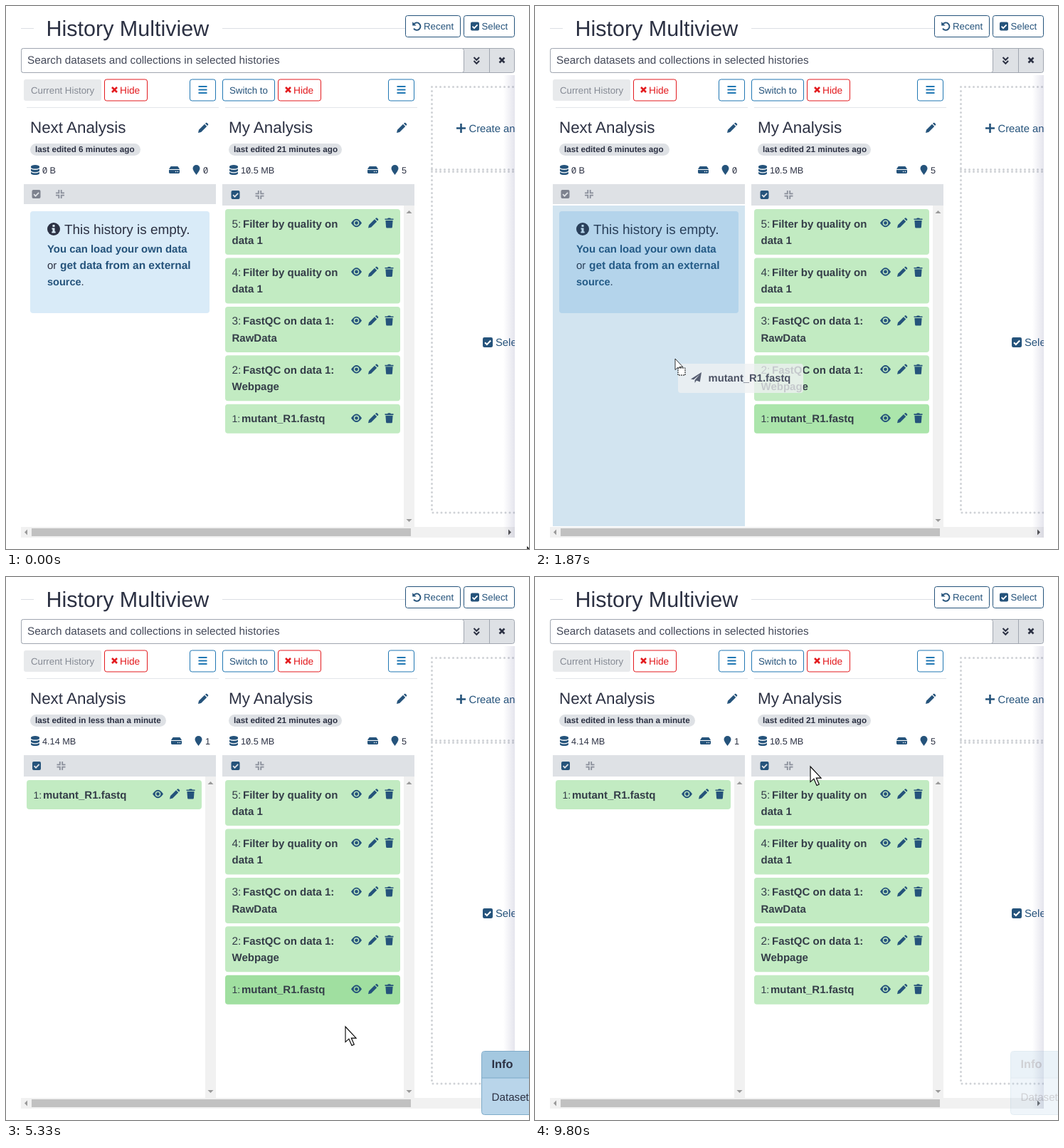
Write an HTML page that moves like this. It is 735x762 px and loops after 9870 ms.

```html
<!DOCTYPE html>
<html lang="en">
<head>
<meta charset="utf-8">
<title>History Multiview</title>
<style>
  html, body { margin: 0; width: 100%; height: 100%; overflow: hidden; background: #fff; }
  svg { display: block; width: 735px; height: 762px; }
  text { font-family: "Liberation Sans", Arial, sans-serif; text-rendering: geometricPrecision; white-space: pre; }
</style>
</head>
<body>
<svg id="stage" viewBox="0 0 735 762"></svg>
<script>
const LOOP = 9870, STEP = 1000 / 15;
const INK = '#2c3143', NAVY = '#25537b', BLUE = '#2077b3', RED = '#e31a1e';
const GREY = '#8a8f9b', BAR = '#dee1e5', TRACK = '#f1f1f1', GREEN = '#c2ebc2', LABEL = '#343d48';

// Drawing helpers
const rect = (x, y, w, h, fill, r = 0, stroke = 'none') =>
  `<rect x="${x}" y="${y}" width="${w}" height="${h}" rx="${r}" fill="${fill}" stroke="${stroke}"/>`;
const text = (x, y, size, s, fill = INK, bold = false) =>
  `<text x="${x}" y="${y}" font-size="${size}" fill="${fill}" font-weight="${bold ? 700 : 400}">${s}</text>`;
const bold = (x, y, size, s, fill = INK) => text(x, y, size, s, fill, true);
const solid = (x, y, d, fill = NAVY) =>
  `<path transform="translate(${x} ${y})" d="${d}" fill="${fill}" fill-rule="evenodd"/>`;
const line = (x, y, d, color, width = 1, extra = '') =>
  `<path transform="translate(${x} ${y})" d="${d}" fill="none" stroke="${color}" stroke-width="${width}" ${extra}/>`;
const group = (id, body) => `<g id="${id}">${body}</g>`;
const ring = (x, y, r) => `M${x - r} ${y}a${r} ${r} 0 1 0 ${2 * r} 0a${r} ${r} 0 1 0 ${-2 * r} 0z`;

const SHAPE = {
  pencil: 'M0 14l1-4.2 8-8 3.2 3.2-8 8zM10 .9l.9-.9q.8-.6 1.6 0l1.5 1.5q.6.8 0 1.6l-.9.9z',
  eye: 'M0 5.5Q7.5-6 15 5.5Q7.5 17 0 5.5z' + ring(7.5, 5.5, 3.8) + ring(7.5, 5.5, 2.4),
  trash: 'M0 1h3.6l.8-1h3.2l.8 1H12v1.6H0zM.9 3.5h10.2l-.7 9.3q-.1 1.2-1.2 1.2H2.8q-1.1 0-1.2-1.2z',
  disks: 'M0 2.2a6 2.2 0 0 1 12 0v1.2a6 2.2 0 0 1-12 0zM0 5.4q6 3.4 12 0v2.6a6 2.2 0 0 1-12 0z' +
    'M0 9.9q6 3.4 12 0v2a6 2.2 0 0 1-12 0z',
  drive: 'M3.2 0h8.6q.8 0 1.2.7L15 4H0L2 .7Q2.4 0 3.2 0zM0 5h15v3.6q0 1.4-1.4 1.4H1.4Q0 10 0 8.6z' +
    ring(9.6, 7.5, .8) + ring(12.4, 7.5, .8),
  marker: 'M5 14Q0 7.5 0 5a5 5 0 0 1 10 0Q10 7.5 5 14z',
  plane: 'M0 9.5L15 0 12.8 13.5 8 11.6 5.6 15V11l7-8-8.6 7.3z',
  arrow: 'M0 0V21.6l4.9-4.4 4.1 9.2 3.3-1.5-4-8.8h6.8z'
};
const cross = (x, y, color) => line(x, y, 'M1 1l7 7M8 1l-7 7', color, 2.6);
const menu = (x, y, color) => line(x, y, 'M0 1h12M0 5.5h12M0 10h12', color, 1.8);
const check = (x, y, color = NAVY, bg = BAR, size = 12) =>
  `<g transform="translate(${x} ${y}) scale(${size / 12})">` +
  rect(0, 0, 12, 12, color, 2) + line(2.6, 6.2, 'M0 0l2.4 2.4 4.6-4.8', bg, 1.8) + '</g>';
const compress = (x, y) =>
  line(x, y, 'M4.3 0v4.3H0M7.7 0v4.3H12M4.3 12V7.7H0M7.7 12V7.7H12', GREY, 1.8);
const slash = (x, y) => line(x, y, 'M1.8-1.2L5.3-8', INK, .9);

function item(x, y, num, lines, id = '') {
  const [gap, size] = num === 1 ? [13, 14] : [15, 15.4];
  return `<rect ${id && `id="${id}"`} x="${x}" y="${y}" width="246" height="${lines.length > 1 ? 64 : 41}" rx="4" fill="${GREEN}"/>` +
    text(x + 9.5, y + 25.5, size, num + ':', LABEL) + bold(x + 10 + gap, y + 25.5, 15, lines[0], LABEL) +
    (lines[1] ? bold(x + 9.5, y + 49, 15, lines[1], LABEL) : '') +
    solid(x + 177, y + 14, SHAPE.eye) + solid(x + 201, y + 12.5, SHAPE.pencil) +
    solid(x + 224.5, y + 12.5, SHAPE.trash);
}

function scroller(x) {
  return rect(x, 280, 15, 451, TRACK) + solid(x + 7.5, 287, 'M-4 4L0 0l4 4z', '#9a9a9a') +
    solid(x + 7.5, 720, 'M-4 0L0 4l4-4z', '#9a9a9a');
}

function columnTop(x, title, hideX) {
  return rect(hideX, 103, 60, 30, '#fff', 3, RED) + cross(hideX + 9.5, 113, RED) +
    text(hideX + 21.5, 122.5, 13.7, 'Hide', RED) +
    rect(x + 233.5, 103, 36, 30, '#fff', 3, BLUE) + menu(x + 245.5, 112, BLUE) +
    rect(x + 4, 142, 270, 1, '#e3e6ea') + text(x + 9, 178, 22.4, title) + solid(x + 245, 164, SHAPE.pencil);
}

function stats(x, edited, pill, size, count, shift) {
  return rect(x + 9, 193, pill, 17, BAR, 8.5) + bold(x + 16, 205.3, 11.7, edited) +
    solid(x + 10, 223, SHAPE.disks) + text(x + 26, 234.7, 12.7, size) +
    solid(x + 204 + shift, 225, SHAPE.drive) + solid(x + 237.5 + shift, 223, SHAPE.marker) +
    text(x + 252 + shift, 234.7, 12.7, count);
}

const header =
  rect(21, 31, 18, 1, '#dcdfe4') + rect(304, 31, 258, 1, '#dcdfe4') + text(56.5, 41.5, 30.5, 'History Multiview') +
  rect(561.5, 13.5, 77, 30, '#fff', 3, NAVY) +
  line(571, 22, 'M1.9 3.8A5.2 5.2 0 1 1 2 9.6', NAVY, 1.9) + solid(571, 22, 'M.2.2v5.4h5.4z') +
  text(587, 33, 13.3, 'Recent', NAVY) +
  rect(643.5, 13.5, 71, 30, '#fff', 3, NAVY) + check(653, 22.5, NAVY, '#fff') + text(668.5, 33, 13.2, 'Select', NAVY) +
  rect(21.5, 59.5, 693, 34, BAR, 3, '#a0a6b0') + rect(21.5, 59.5, 622, 34, '#fff', 3, '#a0a6b0') +
  rect(679, 60, 1, 33, '#a0a6b0') + text(30, 81, 15.3, 'Search datasets and collections in selected histories', '#454a5a') +
  line(656.5, 71, 'M1 1l3.8 3.8L8.6 1M1 6l3.8 3.8L8.6 6', INK, 2) + cross(692.5, 71.5, INK);

const emptyHistory =
  stats(25, 'last edited 6 minutes ago', 155, '0 B', '0', 0) + slash(51, 234.7) + slash(277, 234.7) +
  rect(25, 250, 270, 28, BAR) + check(36.5, 258, '#7d828e') + compress(70, 258) +
  rect(34, 288, 252, 143, '#d9ebf8', 4) + `<circle cx="67" cy="313" r="9" fill="${INK}"/>` +
  solid(67, 313, 'M-1.5-6h3v3h-3zM-2.5-1.5h4v5h1.2v2h-5.4v-2h1.2v-3h-1z', '#d9ebf8') +
  text(82, 320, 18.95, 'This history is empty.') + bold(58, 346, 14.9, 'You can load your own data', NAVY) +
  text(58, 369, 15, 'or') + bold(76, 369, 15.45, 'get data from an external', NAVY) +
  bold(58, 392, 14.5, 'source', NAVY) + text(105.5, 392, 15, '.');

const filledHistory =
  stats(25, 'last edited in less than a minute', 191, '4.14 MB', '1', 3) +
  rect(25, 250, 270, 30, BAR) + check(37, 259) + compress(71.5, 259) +
  scroller(280) + item(29, 285, 1, ['mutant_R1.fastq']);

const names = [['Filter by quality on', 'data 1'], ['Filter by quality on', 'data 1'],
  ['FastQC on data 1:', 'RawData'], ['FastQC on data 1:', 'Webpage'], ['mutant_R1.fastq']];

const columns =
  rect(25, 103, 109, 30, '#e8eaec', 3) + text(35, 122.5, 13.25, 'Current History', '#858a94') +
  columnTop(25, 'Next Analysis', 138.5) + group('empty', emptyHistory) + group('filled', filledHistory) +
  `<rect id="dropzone" x="25" y="280" width="270" height="450" fill="#1e78b4" fill-opacity=".2"/>` +
  rect(304.5, 103, 73, 30, '#fff', 3, BLUE) + text(314, 122.5, 13.3, 'Switch to', NAVY) +
  columnTop(304, 'My Analysis', 382.5) + stats(304, 'last edited 21 minutes ago', 159, '10.5 MB', '5', 0) + slash(337.1, 234.7) +
  rect(304, 250, 270, 30, BAR) + check(316.5, 259) + compress(350.5, 259) + scroller(559) +
  names.map((n, i) => item(308, 285 + i * 68.45, 5 - i, n, i === 4 ? 'source' : '')).join('');

const dots = 'stroke-dasharray="0 6" stroke-linecap="round"';
const side =
  `<rect id="hover" x="597" y="112" width="118" height="120" fill="#eef2f6"/>` +
  line(598.5, 113.5, 'M0 0H120M0 0V116M0 116H120M0 119H120M0 119V597.5H120', '#cfd2d6', 3, dots) +
  line(633, 165, 'M0 6.5h13M6.5 0v13', NAVY, 2.6) + text(650.5, 176.5, 14.8, 'Create an', NAVY) +
  check(670, 465, NAVY, '#fff', 14) + text(688, 477, 14.8, 'Sele', NAVY) +
  rect(21, 731, 694, 15, TRACK) + rect(36, 733, 533, 11, '#c1c1c1') +
  solid(26, 738.5, 'M4-4L0 0l4 4z', '#9a9a9a') + solid(706, 738.5, 'M0-4L4 0 0 4z', '#505050') +
  '<defs><linearGradient id="shade"><stop offset="0" stop-color="#505088" stop-opacity="0"/>' +
  '<stop offset="1" stop-color="#505088" stop-opacity=".15"/></linearGradient></defs>' +
  rect(699, 97, 16, 649, 'url(#shade)') + rect(715, 94, 20, 668, '#fff');

const toast =
  rect(668.5, 665.5, 90, 89, '#b9d5ea', 4, '#7fabc9') +
  '<path d="M669 703V669q0-3 3-3h63v37z" fill="#a4c8e0"/>' + rect(669, 702.5, 66, 1, '#7fabc9') +
  bold(682.5, 689, 16.3, 'Info') + text(682.5, 734.5, 15.2, 'Dataset');

const ghost =
  `<g opacity=".78">${rect(4, 7, 176, 41, '#eff1f3', 4)}</g>` +
  solid(22, 19, SHAPE.plane, '#555c70') + bold(46.5, 32, 14.8, 'mutant_R1.fastq', '#4d5365');

const pointer = d => `<path d="${d}" fill="#fff" stroke="#000" stroke-width="1.1"/>`;
const cursor = group('cursor',
  group('arrow', pointer(SHAPE.arrow)) +
  group('beam', line(0, 0, 'M-3.5-8.5h2.5l1 1 1-1h2.5M0-7.5v17M-3.5 10.5h2.5l1-1 1 1h2.5', '#000', 1.4)) +
  group('drag', ghost + `<g transform="scale(.72)">${pointer(SHAPE.arrow)}</g>` +
    '<rect x="4" y="13" width="10" height="10" fill="#fff" stroke="#000" stroke-dasharray="2 1"/>'));

document.getElementById('stage').innerHTML =
  header + columns + side + group('toast', toast) + cursor;

// Motion tables: [ms, value, ...]
const PATH = [
  [0, 733, 760], [200, 640, 560], [400, 470, 260], [533, 392, 170], [600, 380, 161], [667, 345, 320],
  [733, 320, 490], [800, 320, 490], [933, 541, 574], [1067, 430, 572], [1267, 430, 572], [1333, 419, 568],
  [1600, 300, 520], [1867, 197, 495], [2067, 179, 497], [4400, 179, 497], [5333, 477, 631], [5667, 477, 631],
  [5933, 570, 651], [6000, 570, 651], [6133, 576, 651], [6200, 576, 651], [6267, 580, 651],
  [8133, 713, 240], [9000, 142, 690], [9067, 142, 690], [9200, 76, 735], [9400, 319, 640],
  [9600, 319, 640], [9800, 387, 266]
];
const TOAST = [[4399, 0, 23], [4400, .4, 23], [4600, 1, 0], [9600, 1, 0], [9800, .22, 0]];
const FOCUS = [[1332, 194, 235, 194], [1333, 171, 229, 171], [2333, 171, 229, 171], [2467, 160, 223, 160],
  [9067, 160, 223, 160], [9333, 194, 235, 194]];

function sample(table, t) {
  const i = table.findIndex(row => row[0] > t);
  if (i === 0) return table[0].slice(1);
  if (i < 0) return table[table.length - 1].slice(1);
  const a = table[i - 1], b = table[i], k = (t - a[0]) / (b[0] - a[0]);
  return a.slice(1).map((v, j) => v + (b[j + 1] - v) * k);
}

const el = id => document.getElementById(id);
const show = (id, on) => { el(id).style.display = on ? '' : 'none'; };
const between = (t, a, b) => t >= a && t < b;

function draw(now) {
  const t = Math.floor((now % LOOP + 4) / STEP) * STEP + .5;
  const [x, y] = sample(PATH, t);
  const dragging = between(t, 1333, 2333);
  const beam = t < 1000 && between(y, 150, 185);
  el('cursor').setAttribute('transform', `translate(${x} ${y})`);
  show('cursor', !between(t, 6333, 8133));
  show('drag', dragging);
  show('beam', beam);
  show('arrow', !dragging && !beam);
  show('dropzone', dragging && x < 295);
  show('empty', t < 4666);
  show('filled', t >= 4666);
  show('hover', between(t, 7400, 7533));
  const [alpha, dy] = sample(TOAST, t);
  el('toast').setAttribute('opacity', alpha);
  el('toast').setAttribute('transform', `translate(0 ${dy})`);
  el('source').setAttribute('fill', `rgb(${sample(FOCUS, t).map(Math.round)})`);
}

const start = performance.now();
function tick() {
  draw(performance.now() - start);
  requestAnimationFrame(tick);
}
tick();
</script>
</body>
</html>
```
